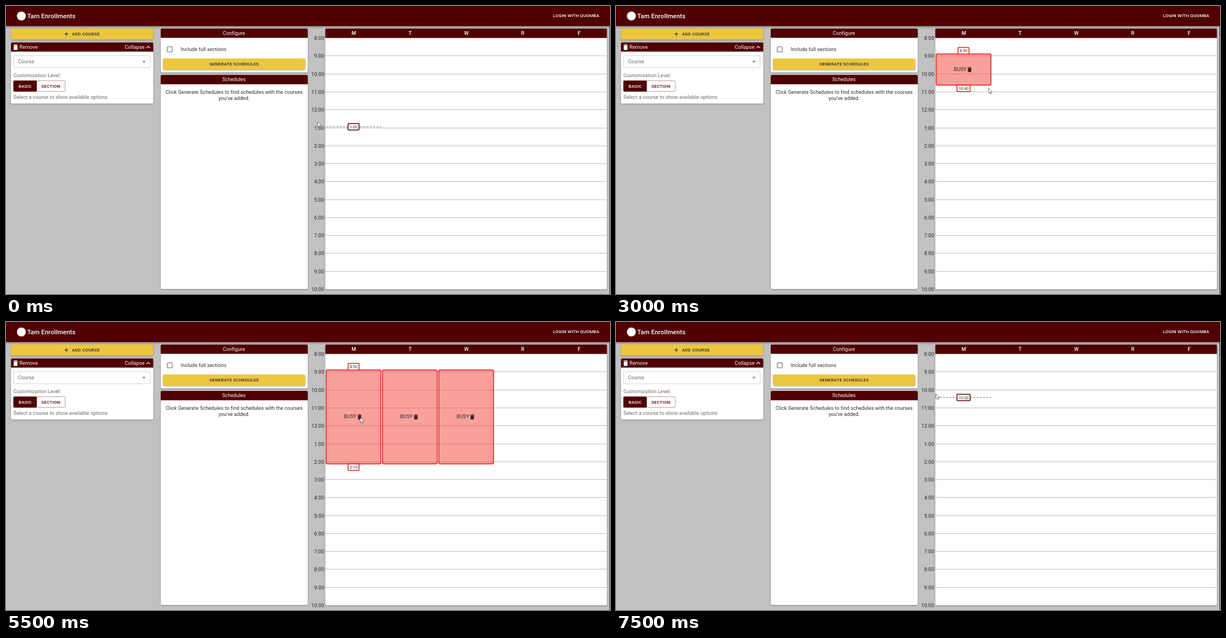
These frames come from a looping animation (1081 by 518 pixels, 8 s). An HTML page:

```html
<!DOCTYPE html>
<html lang="en">
<head>
<meta charset="utf-8">
<title>Course scheduler</title>
<style>
  html, body { margin: 0; width: 100%; height: 100%; overflow: hidden; background: #c1c1c1; }
  svg { display: block; }
  text { font-family: Roboto, Arial, sans-serif; letter-spacing: .009em; }
  .caps { font-weight: 500; letter-spacing: .0286em; }
  .raised { filter: drop-shadow(0 1px 1px rgba(0, 0, 0, .35)); }
</style>
</head>
<body>
<svg width="1081" height="518" viewBox="0 0 1081 518">
  <defs>
    <path id="trash" d="M-6 7c0 1.1.9 2 2 2h8c1.1 0 2-.9 2-2V-5H-6zM7-8H3.5l-1-1h-5l-1 1H-7v2H7z"/>
    <path id="cursor" d="M0 0V9.2L2.1 7.4L3.5 10.6L5 9.9L3.6 6.9L6.4 6.6Z" fill="#fff" stroke="#555" stroke-width=".8"/>
  </defs>
  <g id="page"></g>
  <g id="live"></g>
</svg>
<script>
const MAROON = '#500000', GOLD = '#ecc63f', RED = '#e31b1b', INK = '#2b2b2b', GREY = '#686868';
const HOUR = 32.27, TOP = 57.7, DAY = 100.8;
const yOf = hour => TOP + (hour - 8) * HOUR;
const dayX = day => 622 + day * DAY;

const rect = (x, y, w, h, fill, extra = '') =>
  `<rect x="${x}" y="${y}" width="${w}" height="${h}" fill="${fill}" ${extra}/>`;

// y is the middle of the capital letters
const text = (x, y, str, { size = 9, fill = INK, anchor = 'middle', extra = '' } = {}) =>
  `<text x="${x}" y="${y + size * .355}" font-size="${size}" fill="${fill}" text-anchor="${anchor}" ${extra}>${str}</text>`;

const left = (x, y, str, fill, more) => text(x, y, str, { fill, anchor: 'start', ...more });
const caps = (x, y, str, fill, more) => text(x, y, str, { size: 7.88, fill, extra: 'class="caps"', ...more });
const line = (d, stroke, width = 1, extra = '') =>
  `<path d="${d}" fill="none" stroke="${stroke}" stroke-width="${width}" ${extra}/>`;
const trash = (x, y, scale, fill) =>
  `<use href="#trash" transform="translate(${x} ${y}) scale(${scale})" fill="${fill}"/>`;

function card(x, y, w, h, head) {
  return `<g class="raised">${rect(x, y, w, h, '#fff', 'rx="2"')}
    <path d="M${x} ${y + head}v${2 - head}q0-2 2-2h${w - 4}q2 0 2 2v${head - 2}z" fill="${MAROON}"/></g>`;
}

const button = (x, y, w, h) => rect(x, y, w, h, GOLD, 'rx="2" class="raised"');

function drawPage() {
  let s = rect(0, 0, 1081, 36, MAROON, 'style="filter:drop-shadow(0 1px 2px rgba(0,0,0,.5))"');
  s += '<circle cx="27.5" cy="18" r="8" fill="#fff"/>';
  s += left(38, 18, 'Tam Enrollments', '#fff', { size: 11.26, extra: 'font-weight="500"' });
  s += caps(1062, 17.5, 'LOGIN WITH QUOMBA', '#fff', { anchor: 'end' });

  s += button(9, 40.3, 254.5, 20.3);
  s += line('M104.5 50.5h7M108 47v7', INK, 1.1) + caps(118, 50.3, 'ADD COURSE', INK, { anchor: 'start' });

  s += card(9, 65.5, 254.5, 110, 16.5);
  s += trash(17.2, 74, .563, '#fff') + left(24, 74, 'Remove', '#fff');
  s += text(248, 74, 'Collapse', { fill: '#fff', anchor: 'end' });
  s += line('M251.5 75.6l3.2-3.2 3.2 3.2', '#fff', 1.2);
  s += rect(13.5, 89.3, 244.5, 21.7, '#fff', 'rx="2" stroke="#c6c6c6" stroke-width=".8"');
  s += left(21.5, 100, 'Course', GREY) + `<path d="M244 98.8h5.8l-2.9 2.9z" fill="${GREY}"/>`;
  s += left(13.3, 125, 'Customization Level:', GREY);
  s += rect(13.5, 134.5, 92.5, 19, '#fff', 'rx="2" stroke="#a67f7f" stroke-width=".8"');
  s += rect(13.2, 134, 42, 20, MAROON, 'rx="2"');
  s += caps(34.2, 143.8, 'BASIC', '#fff') + caps(80.3, 143.8, 'SECTION', MAROON);
  s += left(13.3, 164, 'Select a course to show available options', GREY);

  s += card(277, 40.5, 263, 79, 16.7) + text(408, 48.5, 'Configure', { fill: '#fff' });
  s += rect(288.5, 73.5, 9, 9, '#fff', `rx="1" stroke="${GREY}" stroke-width="1.1"`);
  s += left(312.8, 78, 'Include full sections');
  s += button(281, 94.5, 254.5, 20) + caps(408.3, 104.3, 'GENERATE SCHEDULES', INK);

  s += card(277, 124, 263, 385, 16.7) + text(408, 132, 'Schedules', { fill: '#fff' });
  s += text(408.3, 155, 'Click Generate Schedules to find schedules with the courses');
  s += text(408.3, 165.7, "you've added.");

  s += card(571.5, 40.5, 504, 469, 17);
  [...'MTWRF'].forEach((day, i) => s += text(dayX(i) + .5, 48.7, day, { fill: '#fff', extra: 'font-weight="500"' }));
  for (let h = 8; h <= 22; h++) {
    const y = yOf(h);
    if (h > 8 && h < 22) s += line(`M571.5 ${Math.floor(y) + .5}h504`, '#bcbcbc');
    s += text(569.3, y + .3, clock(h), { anchor: 'end' });
  }
  return s + rect(1080, 37, 1, 481, '#333');
}

// nearest ten minutes on a twelve-hour clock
function clock(hour) {
  const tens = Math.round(hour * 6);
  return `${(Math.floor(tens / 6) + 11) % 12 + 1}:${tens % 6}0`;
}

function tag(day, y, hour, colour) {
  const label = clock(hour), w = label.length > 4 ? 23.5 : 19.5, x = dayX(day);
  return rect(x - w / 2, y - 5.8, w, 11.6, '#fff', `rx="1" stroke="${colour}" stroke-width="1.5"`)
    + text(x, y + .2, label, { size: 7.2 });
}

function block(day, end) {
  const x = dayX(day), top = yOf(8 + 5 / 6) + 1.6, bottom = yOf(end) - 1.5, mid = (top + bottom) / 2;
  return rect(x - 49, top, 98, bottom - top, 'rgba(244,67,54,.5)', `rx="2" stroke="${RED}" stroke-width="1.5"`)
    + left(x - 17.2, mid - .4, 'BUSY') + trash(x + 10.8, mid, .5, '#402020');
}

const tags = (day, end) =>
  tag(day, yOf(8 + 5 / 6) - 4.2, 8 + 5 / 6, RED) + tag(day, yOf(end) + 4.4, end, RED);

const guide = (day, y) =>
  line(`M${dayX(day) - 49} ${y}h98.5`, '#777', 1.1, 'stroke-dasharray="4 2"')
  + tag(day, y, 8 + (y - TOP) / HOUR, MAROON);

// One pose per half second: cursor, busy days, block end, tagged day, guide [day, y]
const LATE = 14 + 1 / 6;
const poses = [
  { at: [558, 208], guide: [0, 217.3] },
  { at: [300, 190] },
  { at: [164, 172] },
  { at: [162.5, 170] },
  { at: [480, 135] },
  { at: [640, 84], guide: [0, 86] },
  { at: [667, 147.5], days: [0], end: 10 + 2 / 3, tagged: 0 },
  { at: [805, 254], days: [0, 1, 2], end: LATE, tagged: 0 },
  { at: [735, 289], days: [0, 1, 2], end: LATE, guide: [1, 290] },
  { at: [658, 311.5], days: [0, 1, 2], end: LATE, guide: [0, 311] },
  { at: [648, 205], days: [0, 1, 2], end: LATE, tagged: 0 },
  { at: [634, 172], days: [0, 1, 2], end: LATE, tagged: 0 },
  { at: [746.5, 178], days: [1, 2], end: LATE, tagged: 1 },
  { at: [795.5, 174.5], days: [2], end: LATE, tagged: 2 },
  { at: [833, 171], days: [2], end: LATE, tagged: 2 },
  { at: [572.5, 129], guide: [0, 135.8] }
];

function drawPose({ at, days = [], end, tagged, guide: mark }) {
  let s = days.map(day => block(day, end)).join('');
  if (tagged !== undefined) s += tags(tagged, end);
  if (mark) s += guide(...mark);
  return s + `<use href="#cursor" x="${at[0]}" y="${at[1]}"/>`;
}

document.getElementById('page').innerHTML = drawPage();
const live = document.getElementById('live');
let shown = -1;
function tick() {
  const step = Math.floor(performance.now() % 8000 / 500);
  if (step !== shown) live.innerHTML = drawPose(poses[shown = step]);
  requestAnimationFrame(tick);
}
tick();
</script>
</body>
</html>
```
